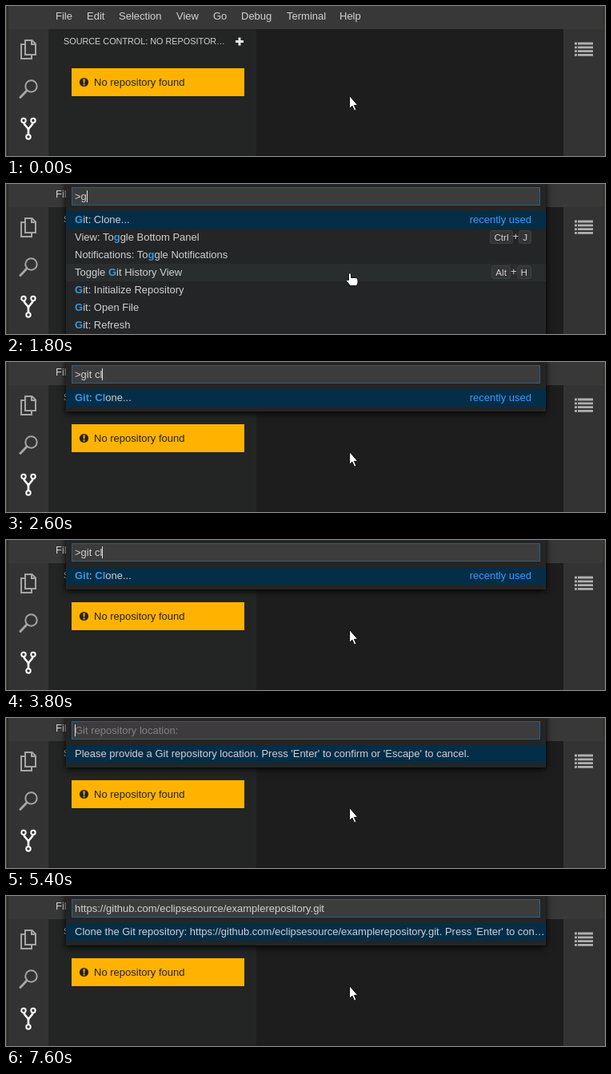
An HTML page for the animation above (8000 ms loop, 749 px wide and 188 px high).

```html
<!DOCTYPE html>
<html lang="en">
<head>
<meta charset="utf-8">
<title>Git clone from the command palette</title>
<style>
html, body { margin: 0; width: 100%; height: 100%; overflow: hidden; background: #1d1d1d; }
body, svg text { font: 13px "Liberation Sans", Arial, sans-serif; }
svg { position: absolute; left: 0; top: 0; }
#palette {
  position: absolute; left: 75px; top: -6px; width: 600px; padding: 40px 0 6px;
  box-sizing: border-box; background: #232526; color: #d0d0d0;
  box-shadow: 0 2px 8px #000; line-height: 22px; white-space: pre;
}
#field {
  position: absolute; left: 7px; top: 10px; width: 586px; height: 23px; box-sizing: border-box;
  padding-left: 3px; border: 1px solid #2b5f83; background: #3c3c3c; line-height: 21px;
}
#field i { position: absolute; top: 3px; width: 1px; height: 15px; background: #e0e0e0; }
#field em { font-style: normal; color: #808080; }
.row { position: relative; height: 22px; padding-left: 11px; overflow: hidden; text-overflow: ellipsis; }
.row:first-child { background: #042d48; }
.hover .row:nth-child(4) { background: #2a2d2d; }
.row b { color: #3c96d8; }
.side { position: absolute; right: 18px; top: 0; }
.recent { color: #4199f5; }
kbd {
  display: inline-block; height: 15px; margin-top: 2px; padding: 0 4px; vertical-align: top;
  border: 1px solid #404141; border-radius: 3px; background: #333435;
  font: 11.7px/16px "Liberation Sans", Arial, sans-serif;
}
.plus { display: inline-block; vertical-align: top; line-height: 20px; }
</style>
</head>
<body>
<svg width="749" height="188">
  <path fill="#383838" d="M0 0H749V29H0z"/>
  <path fill="#333" d="M0 29H53V188H0zM697 29H749V188H697z"/>
  <path fill="#232525" d="M53 29H313V188H53z"/>
  <path fill="#1d1d1d" d="M313 29H697V188H313z"/>
  <path fill="#48473d" d="M0 0H1V188H0zM748 0H749V188H748z"/>
  <path fill="#2a2a27" d="M1 0H3V188H1zM747 0H748V188H747z"/>
  <g id="menu" fill="#d2d2d2"></g>
  <text x="72" y="48" fill="#d0d0d0" style="font-size:10.833px">SOURCE CONTROL: NO REPOSITOR…</text>
  <path stroke="#e6e6e6" stroke-width="3" d="M287 44.5H297M292 39.5V49.5"/>
  <path fill="#ffb300" d="M82 78H298V113H82z"/>
  <circle cx="97.5" cy="95.5" r="5.6" fill="#232323"/>
  <path fill="#ffb300" d="M96.5 91.5H98.7L98.3 96.5H96.8zM96.6 97.5H98.5V99.4H96.6z"/>
  <text x="110" y="100" fill="#232323">No repository found</text>
  <g fill="none" stroke="#a6a6a6" stroke-width="2">
    <path d="M24 43H32.5L37 47.5V61H24zM32 43V48H37M24 48H19V66H32V61"/>
    <circle cx="31.5" cy="100.5" r="7.2"/>
    <path stroke-width="3" stroke-linecap="round" d="M26 106L18 114.5"/>
  </g>
  <g fill="none" stroke="#fff" stroke-width="2">
    <circle cx="22" cy="143.5" r="2.7"/>
    <circle cx="34" cy="143.5" r="2.7"/>
    <circle cx="28" cy="164" r="2.7"/>
    <path stroke-width="2.6" d="M22.5 146.5C23 151 28 151 28 156V161M33.5 146.5C33 151 28 151 28 156"/>
  </g>
  <path stroke="#b0b0b0" stroke-width="2.8" d="M711 47H714M715 47H734M711 51.8H714M715 51.8H734M711 56.6H714M715 56.6H734M711 61.4H714M715 61.4H734"/>
</svg>
<div id="palette"><div id="field"></div><div id="list"></div></div>
<svg width="749" height="188" fill="#fff" stroke="#111" stroke-linejoin="round">
  <path id="arrow" d="M429.5 112.5V128.5L433 125.3L435.6 131.3L438 130.2L435.4 124.4H439.8z"/>
  <path id="hand" d="M428.5 112.5Q430 111 431.5 112.5V117.5H437.5Q440 118 440 120V124L438.5 127.5H430.5L425.5 121.5Q425.5 119.5 428.5 120.5z"/>
</svg>
<script>
const $ = id => document.getElementById(id);

const menu = { File: 62, Edit: 101, Selection: 141, View: 213, Go: 259, Debug: 294, Terminal: 351, Help: 417 };
$('menu').innerHTML = Object.entries(menu)
  .map(([name, x]) => `<text x="${x}" y="17">${name}</text>`).join('');

// Command label and its key binding
const commands = [
  ['Git: Clone...'],
  ['View: Toggle Bottom Panel', 'Ctrl+J'],
  ['Notifications: Toggle Notifications'],
  ['File: Delete', 'Delete'],
  ['File: New File'],
  ['Task: Run Task...'],
  ['Toggle Git History View', 'Alt+H'],
  ['Git: Initialize Repository'],
  ['Git: Open File'],
  ['Git: Refresh']
];
const url = 'https://github.com/eclipsesource/examplerepository.git';
const hint = "Press 'Enter' to confirm or 'Escape' to cancel.";

// Start time, input text (null = palette closed), caret shown
const steps = [
  [0, null], [1000, '>', 1], [1400, '>', 0], [1800, '>g', 1], [2000, '>git', 1],
  [2200, '>git ', 1], [2600, '>git cl', 1], [3200, '>git cl', 0], [3800, '>git cl', 1],
  [4000, '>git clo', 1], [4200, '>git clon', 1], [4400, '>git clone', 1], [5000, '>git clone', 0],
  [5200, null], [5400, '', 1], [5800, '', 0], [6400, url, 1], [7600, url, 0]
];

const row = (label, side = '') => `<div class="row">${label}${side}</div>`;

function mark(label, words) {
  for (const word of words) {
    const start = new RegExp('\\b' + word, 'i');
    label = label.replace(start.test(label) ? start : new RegExp(word, 'i'), '<b>$&</b>');
  }
  return label;
}

function sideNote(label, keys) {
  if (label === commands[0][0]) return '<span class="side recent">recently used</span>';
  if (!keys) return '';
  const caps = keys.split('+').map(key => `<kbd>${key}</kbd>`);
  return `<span class="side">${caps.join('<span class="plus">+</span>')}</span>`;
}

function commandRows(query) {
  const words = query.split(' ').filter(Boolean);
  return commands
    .filter(([label]) => words.every(word => label.toLowerCase().includes(word)))
    .map(([label, keys]) => row(mark(label, words), sideNote(label, keys)));
}

function show([, text, caret]) {
  const open = text !== null;
  let rows = [];
  if (open) {
    const bar = caret ? '<i></i>' : '';
    $('field').innerHTML = text ? text.replace('>', '&gt;') + bar : bar + '<em>Git repository location:</em>';
    rows = text[0] === '>' ? commandRows(text.slice(1))
      : [row(text ? `Clone the Git repository: ${text}. ${hint}` : `Please provide a Git repository location. ${hint}`)];
    $('list').innerHTML = rows.join('');
  }
  const hover = rows.length > 3;
  $('palette').style.display = open ? '' : 'none';
  $('list').className = hover ? 'hover' : '';
  $('hand').style.display = hover ? '' : 'none';
  $('arrow').style.display = hover ? 'none' : '';
}

let current;
function tick() {
  const time = performance.now() % 8000;
  const step = steps.filter(([start]) => start <= time).pop();
  if (step !== current) show(current = step);
  requestAnimationFrame(tick);
}
tick();
</script>
</body>
</html>
```
